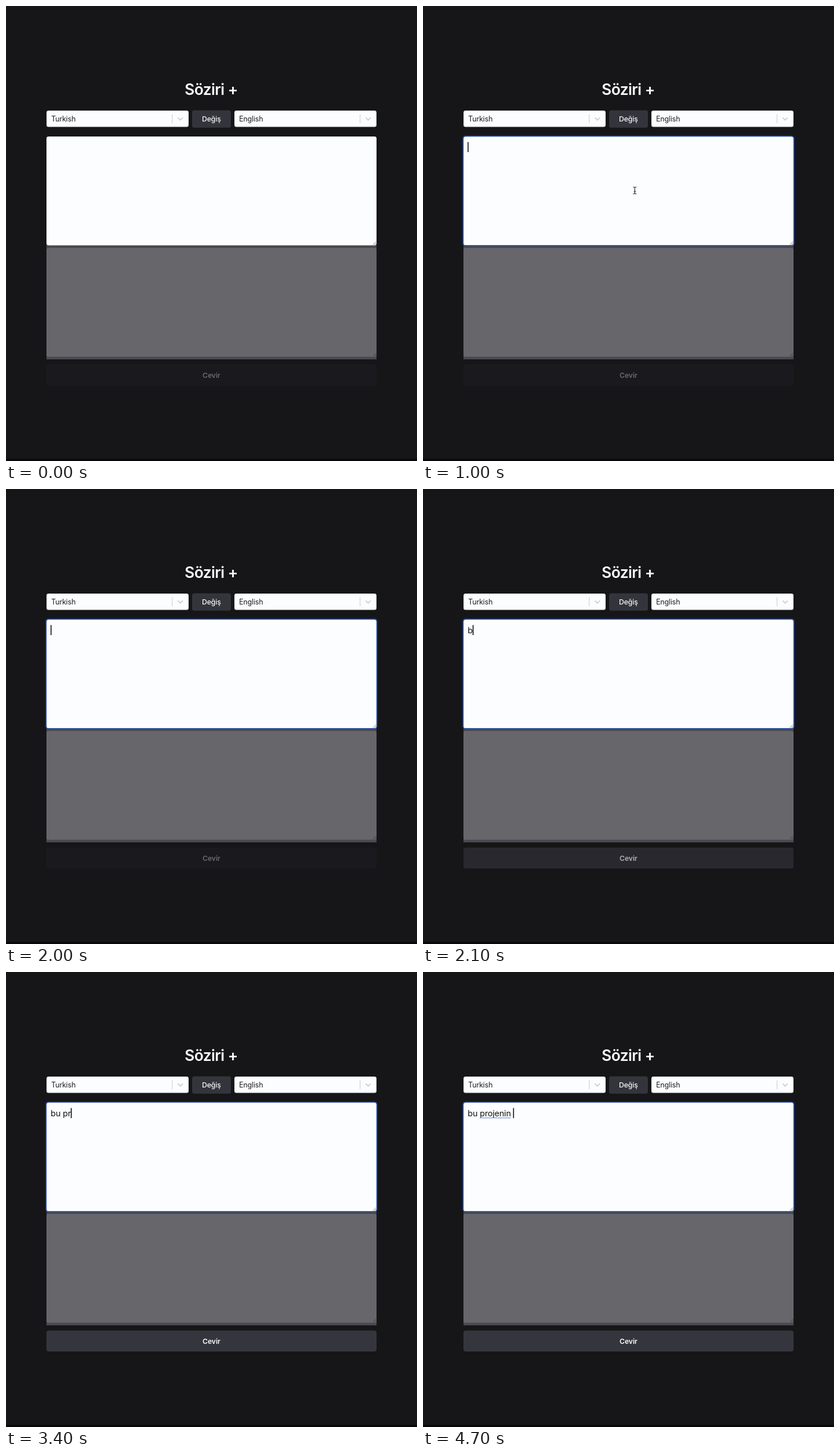
An HTML page with a canvas that plays this animation: 711x788 px, repeating every 5 s.

```html
<!DOCTYPE html>
<html lang="tr">
<head>
<meta charset="utf-8">
<title>Söziri +</title>
<style>
  html, body { margin: 0; width: 100%; height: 100%; overflow: hidden; background: #161618; }
  canvas { display: block; width: 711px; height: 788px; }
</style>
</head>
<body>
<canvas id="stage"></canvas>
<script>
const W = 711, H = 788, LOOP = 5000;
const FONT = 'Inter, "Liberation Sans", sans-serif';
const canvas = document.getElementById('stage');
const ctx = canvas.getContext('2d');
const ratio = window.devicePixelRatio || 1;
canvas.width = W * ratio;
canvas.height = H * ratio;
ctx.scale(ratio, ratio);

// [start ms, value]
const typed = [
  [0, ''], [2100, 'b'], [2200, 'bu'], [2500, 'bu '], [2800, 'bu p'],
  [3400, 'bu pr'], [3500, 'bu pro'], [3800, 'bu proj'], [4000, 'bu projen'],
  [4200, 'bu projeni'], [4400, 'bu projenin'], [4700, 'bu projenin ']
];
const caretAlpha = [[0, 0], [500, 1], [1100, 0.45], [1200, 0], [1500, 0.5], [1600, 1]];
const focusAlpha = [[0, 0], [500, 0.6], [600, 1]];
const buttonAlpha = [[0, 0], [2100, 0.5], [2200, 1]];
const pointer = [
  [0, null], [200, [457, 372]], [400, [400, 338]], [500, [369, 320]],
  [600, [367, 319.5]], [700, [366.4, 319.5]], [1900, null]
];

function at(track, t) {
  let value = track[0][1];
  for (const [start, v] of track) if (t >= start) value = v;
  return value;
}

function mix(a, b, k) {
  return `rgb(${a.map((v, i) => Math.round(v + (b[i] - v) * k)).join(',')})`;
}

function box(x, y, w, h, r, fill) {
  ctx.beginPath();
  ctx.roundRect(x, y, w, h, r);
  ctx.fillStyle = fill;
  ctx.fill();
}

function line(points, color, width) {
  ctx.beginPath();
  points.forEach(([x, y], i) => i ? ctx.lineTo(x, y) : ctx.moveTo(x, y));
  ctx.strokeStyle = color;
  ctx.lineWidth = width;
  ctx.stroke();
}

function setFont(size, weight, spacing) {
  ctx.font = `${weight} ${size}px ${FONT}`;
  ctx.letterSpacing = spacing + 'px';
}

function label(str, x, y, color, align = 'left') {
  ctx.textAlign = align;
  ctx.fillStyle = color;
  ctx.fillText(str, x, y);
}

function select(x, str) {
  box(x, 181, 246, 28.5, 3.5, '#cfcfd2');
  box(x + 0.7, 181.7, 244.6, 27.1, 3, '#fcfdff');
  setFont(12.4, 400, -0.1);
  label(str, x + 8.2, 199.6, '#1b1b1e');
  line([[x + 217.5, 187.5], [x + 217.5, 203]], '#cccccf', 1);
  ctx.lineCap = ctx.lineJoin = 'round';
  line([[x + 227.8, 193.8], [x + 231.6, 197.7], [x + 235.4, 193.8]], '#c6c6c9', 1.6);
  ctx.lineCap = 'butt';
}

function grip(y, color) {
  line([[634.8, y + 6], [640.3, y + 0.5]], color, 0.9);
  line([[637.8, y + 6], [640.3, y + 3.5]], color, 0.9);
}

function beam([x, y]) {
  const shape = (color, width) => {
    for (const s of [-1, 1]) {
      line([[x - 3, y + 6 * s], [x - 1.2, y + 5.8 * s], [x, y + 4.8 * s],
            [x + 1.2, y + 5.8 * s], [x + 3, y + 6 * s]], color, width);
    }
    line([[x, y - 5], [x, y + 5]], color, width);
    line([[x - 1.6, y + 1.8], [x + 1.6, y + 1.8]], color, width);
  };
  shape('#fcfdff', 2.4);
  shape('#222', 1.1);
}

function editor(t) {
  box(70, 226, 571, 188.5, 3.5, '#fcfdff');
  const focus = at(focusAlpha, t);
  if (focus) {
    ctx.globalAlpha = focus;
    ctx.beginPath();
    ctx.roundRect(69.3, 225.3, 572.4, 189.9, 4);
    ctx.strokeStyle = '#28499a';
    ctx.lineWidth = 1.8;
    ctx.stroke();
    ctx.globalAlpha = 1;
  }
  grip(407.5, '#77777a');

  const str = at(typed, t);
  setFont(14.4, 400, -0.15);
  label(str, 77.3, 250, '#111113');
  const end = 77.3 + ctx.measureText(str).width;
  if (str.endsWith('nin ')) {
    const from = 77.3 + ctx.measureText('bu ').width;
    const to = 77.3 + ctx.measureText('bu projenin').width;
    line([[from, 252.6], [to, 252.6]], '#7c9ae0', 1.4);
  }
  ctx.globalAlpha = at(caretAlpha, t);
  ctx.fillStyle = '#000';
  ctx.fillRect(end - 0.1, 235.6, 1.5, 17.4);
  ctx.globalAlpha = 1;
}

function draw(t) {
  ctx.fillStyle = '#161618';
  ctx.fillRect(0, 0, W, H);
  ctx.fillStyle = '#0b060a';
  ctx.fillRect(0, 784.5, W, 3.5);

  setFont(26.4, 600, -0.6);
  label('Söziri +', 355, 154.3, '#fdfdfe', 'center');

  select(70, 'Turkish');
  select(395, 'English');
  box(322, 180.7, 67, 30, 3.5, '#34343c');
  setFont(12.2, 500, -0.1);
  label('Değiş', 355.4, 200.3, '#fafafc', 'center');

  ctx.fillStyle = '#4a4950';
  ctx.fillRect(70, 414, 571, 198);
  box(70, 419, 571, 188.5, 3.5, '#67666b');
  grip(600.5, '#3c3c40');
  editor(t);

  const on = at(buttonAlpha, t);
  box(70, 621, 571, 36.3, 4, mix([26, 26, 30], [53, 53, 61], on));
  setFont(12.2, 600, -0.1);
  label('Cevir', 355.4, 643.6, mix([106, 106, 109], [252, 252, 254], on), 'center');

  const pos = at(pointer, t);
  if (pos) beam(pos);
}

const begin = performance.now();
function tick() {
  draw((performance.now() - begin) % LOOP);
  requestAnimationFrame(tick);
}
tick();
</script>
</body>
</html>
```
